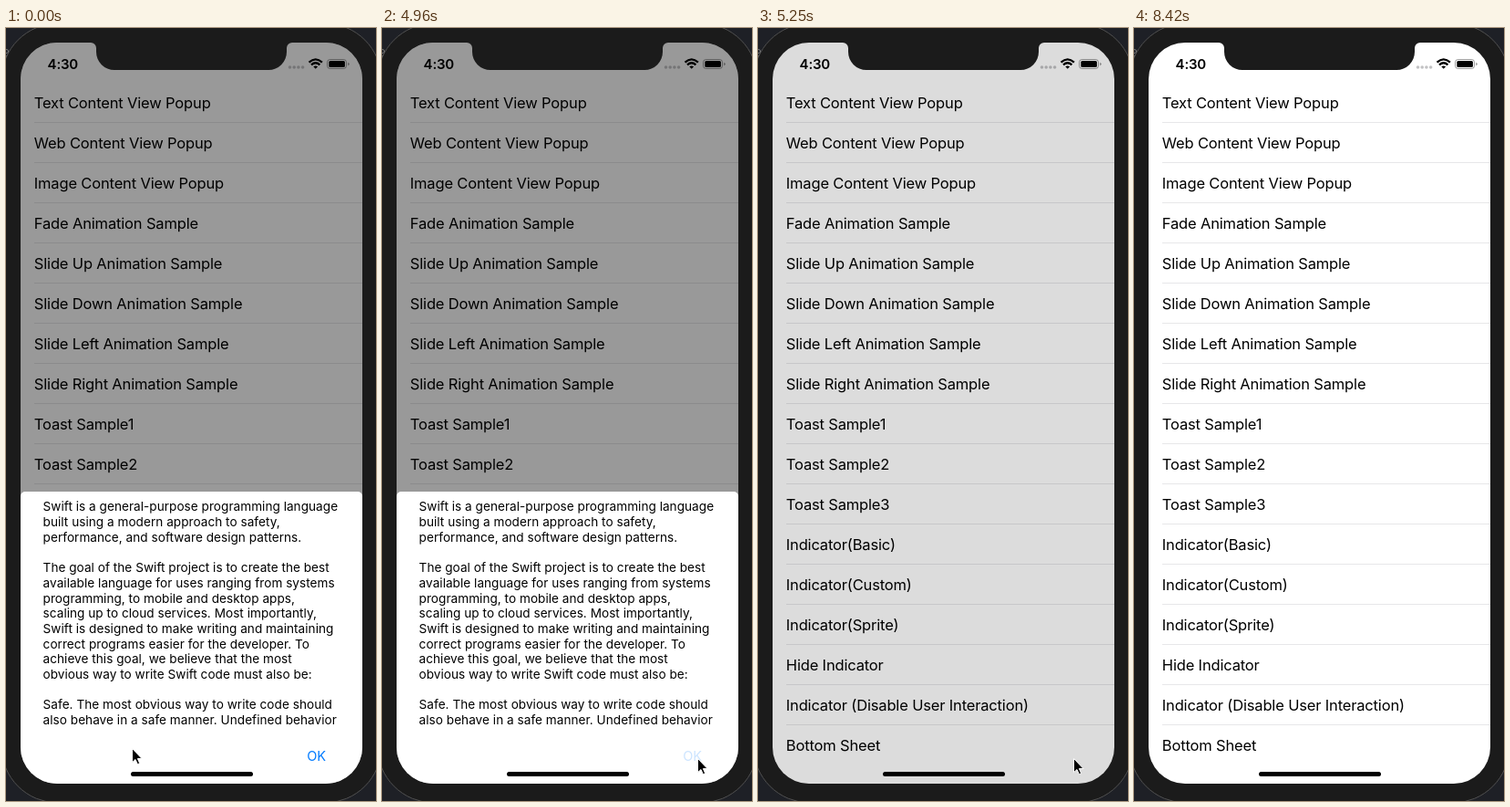
An HTML page for the animation above (8.52 s loop, 406 by 847 pixels).

```html
<!DOCTYPE html>
<html lang="en">
<head>
<meta charset="utf-8">
<title>Bottom sheet demo</title>
<style>
  html, body { margin: 0; width: 100%; height: 100%; overflow: hidden; background: #1e2026; }
  svg { display: block; width: 100%; height: 100%; font-family: Inter, Roboto, sans-serif; }
  text { white-space: pre; }
  .rows text { font-size: 16.5px; letter-spacing: -.16px; }
  .rows path { stroke: #e7e7e9; }
  .copy { font-size: 13.6px; letter-spacing: .025px; }
  .clock { font-size: 15px; font-weight: 600; letter-spacing: -.2px; }
  #ok { font-size: 14.6px; letter-spacing: -.1px; fill: #007aff; }
</style>
</head>
<body>
<svg viewBox="0 0 406 847">
  <defs>
    <clipPath id="screen"><rect x="16" y="16" width="375" height="812" rx="40"/></clipPath>
  </defs>
  <rect width="406" height="847" fill="#1e2026"/>
  <text x="-3" y="31" font-size="11" fill="#777">9</text>
  <rect x="-5" y="-5" width="417" height="854" rx="62" fill="#1b1b1b" stroke="#505050"/>

  <g clip-path="url(#screen)">
    <rect x="16" y="16" width="375" height="812" fill="#fff"/>
    <g class="rows" id="rows"></g>
    <text class="clock" x="45.6" y="44.5">4:30</text>
    <g id="signal" fill="#c2c2c4"></g>
    <g fill="none" stroke="#000" stroke-width="2.2">
      <path d="M332.5 37.6Q339.7 31 346.9 37.6M335 40.3Q339.7 36.2 344.4 40.3"/>
      <path d="M337.3 42.3Q339.7 40.5 342.1 42.3L339.7 44.8Z" fill="#000" stroke="none"/>
    </g>
    <rect x="352.5" y="34.5" width="21" height="10" rx="3" fill="none" stroke="#000" stroke-opacity=".38"/>
    <rect x="354.3" y="36" width="17.6" height="7" rx="1.6"/>
    <path d="M375.2 37.7q1.6 .5 1.6 1.8t-1.6 1.8z" fill-opacity=".4"/>

    <rect id="dim" x="16" y="16" width="375" height="812"/>
    <g id="sheet">
      <rect x="16" y="508" width="375" height="360" rx="5" fill="#fff"/>
      <g class="copy" id="copy"></g>
      <text id="ok" x="330.3" y="803.3">OK</text>
    </g>
    <rect x="137" y="815" width="134" height="5" rx="2.5"/>
  </g>
  <path d="M93 15V16A6 6 0 0 1 99 22V26A20 20 0 0 0 119 46H288A20 20 0 0 0 308 26V22A6 6 0 0 1 314 16V15Z" fill="#1b1b1b"/>

  <path id="cursor" d="M0 0V15.2L3.5 12L5.9 17.2L8.2 16.2L5.9 11.1H10.6Z"
        stroke="#fff" stroke-linejoin="round"/>
</svg>
<script>
  const LOOP = 8520, SCREEN_HEIGHT = 812, DIM = 0.4;
  const $ = id => document.getElementById(id);

  function add(parent, tag, attrs, content = '') {
    const el = document.createElementNS('http://www.w3.org/2000/svg', tag);
    for (const key in attrs) el.setAttribute(key, attrs[key]);
    el.textContent = content;
    parent.append(el);
  }

  const rows = [
    'Text Content View Popup', 'Web Content View Popup', 'Image Content View Popup',
    'Fade Animation Sample', 'Slide Up Animation Sample', 'Slide Down Animation Sample',
    'Slide Left Animation Sample', 'Slide Right Animation Sample',
    'Toast Sample1', 'Toast Sample2', 'Toast Sample3',
    'Indicator(Basic)', 'Indicator(Custom)', 'Indicator(Sprite)', 'Hide Indicator',
    'Indicator (Disable User Interaction)', 'Bottom Sheet'
  ];
  rows.forEach((label, i) => {
    add($('rows'), 'text', { x: 30.8, y: 88 + 44 * i }, label);
    if (i < rows.length - 1) add($('rows'), 'path', { d: `M31 ${103.5 + 44 * i}H391` });
  });

  const copy = [
    'Swift is a general-purpose programming language',
    'built using a modern approach to safety,',
    'performance, and software design patterns.',
    '',
    'The goal of the Swift project is to create the best',
    'available language for uses ranging from systems',
    'programming, to mobile and desktop apps,',
    'scaling up to cloud services. Most importantly,',
    'Swift is designed to make writing and maintaining',
    'correct programs easier for the developer. To',
    'achieve this goal, we believe that the most',
    'obvious way to write Swift code must also be:',
    '',
    'Safe. The most obvious way to write code should',
    'also behave in a safe manner. Undefined behavior'
  ];
  copy.forEach((line, i) => add($('copy'), 'text', { x: 40.6, y: 529.3 + 16.707 * i }, line));

  for (let i = 0; i < 4; i++) add($('signal'), 'circle', { cx: 311.5 + 4.7 * i, cy: 43, r: 1.8 });

  // Progress 0..1 in equal jumps, the first at `start` and the last at `end`.
  function stepped(t, start, end, steps) {
    if (t < start) return 0;
    const jumps = 1 + Math.floor((t - start) / (end - start) * (steps - 1) + 1e-6);
    return Math.min(1, jumps / steps);
  }

  const easeIn = p => p ** 1.88;
  const easeOut = p => 1 - (1 - p) ** 1.5;
  const bend = (a, b, c, p) => a + 2 * p * (1 - p) * (b - a) + p * p * (c - a);

  // Pointer strokes: each bends past `via` and ends at `to`.
  const home = [138.5, 789.5];
  const strokes = [
    { start: 350, end: 470, steps: 3, via: [151, 764], to: [166.5, 740] },
    { start: 860, end: 940, steps: 3, via: [200, 695], to: [238.5, 667.5] },
    { start: 3070, end: 3640, steps: 11, via: [300, 686], to: [346.5, 800.5] },
    { start: 6390, end: 6920, steps: 9, via: [334, 797], to: [303.5, 800.5] },
    { start: 7690, end: 7860, steps: 4, via: [308, 820], to: [316, 852] }
  ];

  function pointer(t) {
    let at = home;
    for (const s of strokes) {
      const p = easeOut(stepped(t, s.start, s.end, s.steps));
      at = at.map((v, i) => bend(v, s.via[i], s.to[i], p));
      if (p < 1) break;
    }
    return at;
  }

  function draw(now) {
    const t = now % LOOP;
    const closing = easeIn(stepped(t, 5080, 5300, 5));
    const pressed = t >= 4960 && t < 5080;
    $('cursor').setAttribute('transform', `translate(${pointer(t)})`);
    $('sheet').setAttribute('transform', `translate(0 ${SCREEN_HEIGHT * closing})`);
    $('dim').setAttribute('opacity', DIM * (1 - closing));
    $('ok').setAttribute('opacity', pressed ? 0.2 : 1);
  }

  const began = performance.now();
  function tick() {
    draw(performance.now() - began);
    requestAnimationFrame(tick);
  }
  tick();
</script>
</body>
</html>
```
